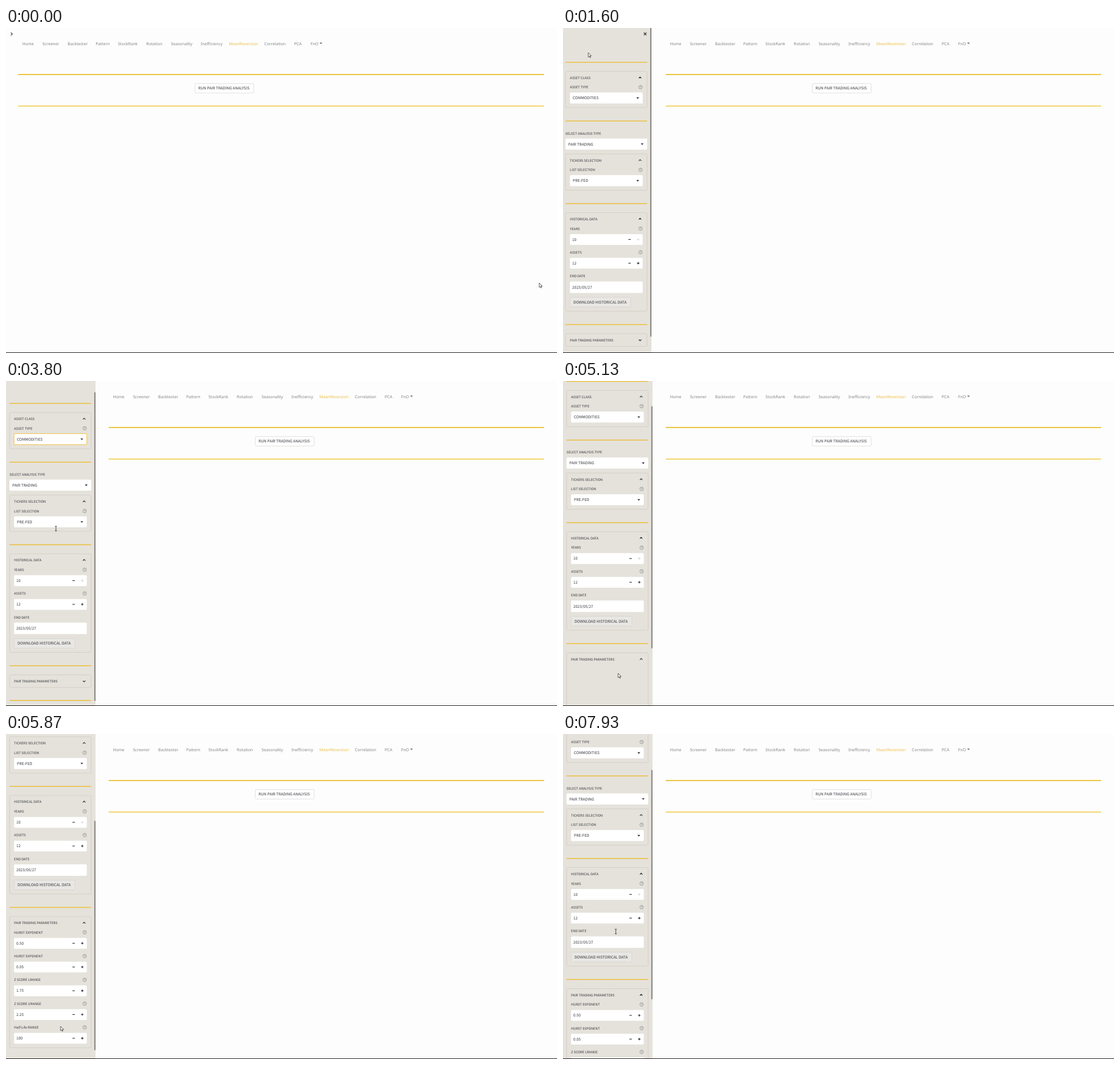
Animation of 960x566 px, one loop 8000 ms. Source, as an HTML page:

```html
<!DOCTYPE html>
<html lang="en">
<head>
<meta charset="utf-8">
<title>Pair trading dashboard</title>
<style>
  html, body { margin: 0; width: 100%; height: 100%; overflow: hidden; background: #fdfdfd; }
  svg { display: block; width: 960px; height: 566px; }
  text { font-family: "Noto Sans CJK JP", "Noto Sans CJK SC", "Noto Sans CJK", sans-serif; font-size: 5.82px; fill: #34353d; text-rendering: geometricPrecision; }
  .big { font-size: 6.62px; }
  .nav { font-family: "Noto Sans", "Open Sans", sans-serif; font-size: 7.05px; fill: #858585; }
  .nav.active { fill: #edbf45; }
  .field { fill: #fff; }
  .frame { fill: none; stroke: #d0ccc3; stroke-width: .8; }
  .button { fill: #e9e7e3; stroke: #d3d1ce; stroke-width: .8; }
  .rule { fill: #edbc30; }
  .mark { fill: none; stroke: #25262d; stroke-width: 1.1; }
  .off { stroke: #d5d5d8; }
</style>
</head>
<body>
<svg id="stage" viewBox="0 0 960 566"></svg>
<script>
const LOOP = 8000, SIDEBAR = 156, VIEW = 566;
const COLLAPSED = 596, EXTRA = 206.5;

const rect = (cls, x, y, w, h, more = '') =>
  `<rect class="${cls}" x="${x}" y="${y}" width="${w}" height="${h}" ${more}/>`;
const text = (x, middle, s, cls = '') => `<text class="${cls}" x="${x}" y="${middle + 2.3}">${s}</text>`;
const path = (d, cls = 'mark', more = '') => `<path class="${cls}" d="${d}" ${more}/>`;
const rule = (y, id = '') => rect('rule', 6, y - .7, 142.5, 1.4, id);
const chevron = (y, up) => path(up ? `M134 ${y + 1}l2.2-2.2 2.2 2.2` : `M134 ${y - 1}l2.2 2.2 2.2-2.2`);
const caret = (x, y) => `<path d="M${x - 2.4} ${y - 1.2}h4.8l-2.4 2.6z" fill="#25262d"/>`;
const help = y => `<circle cx="137" cy="${y}" r="3.1" fill="none" stroke="#85857f" stroke-width=".7"/>` +
  path(`M136 ${y - .7}q0-1 1-1t1 1q0 .6-1 1.2v.5m0 .5v.6`, 'mark', 'style="stroke:#85857f;stroke-width:.6"');

const label = (y, s) => text(14, y, s) + help(y);
const select = (x, y, w, s, id = '') =>
  rect('field', x, y - 9.7, w, 19.2, `rx="1.8" ${id}`) + text(x + 5, y, s, 'big') + caret(x + w - 8.7, y);
const stepper = (y, name, value, maxed) => label(y, name) +
  rect('field', 14, y + 9.7, 126.8, 18.8, 'rx="1.8"') + text(18, y + 19, value, 'big') +
  path(`M115.7 ${y + 19}h4.2`) +
  path(`M130.8 ${y + 19}h4.2m-2.1-2.1v4.2`, maxed ? 'mark off' : 'mark');
const panel = (top, h, title, id = '') =>
  rect('frame', 6.3, top, 142, h, `rx="1.8" ${id}`) + text(14, top + 11, title);

const navItems = [['Home', 28.5], ['Screener', 63.4], ['Backtester', 107.3], ['Pattern', 156.3],
  ['StockRank', 195], ['Rotation', 244.3], ['Seasonality', 287.4], ['Inefficiency', 339.5],
  ['MeanReversion', 388.2], ['Correlation', 450], ['PCA', 502], ['FnO', 530.8]];
const nav = navItems.map(([s, x]) =>
  `<text class="nav ${s === 'MeanReversion' ? 'active' : ''}" x="${x}" y="29.5">${s}</text>`).join('') +
  '<path d="M546.3 25.4h4.8l-2.4 2.6z" fill="#666"/>';

const runButton = '<g id="run">' +
  rect('', 329.3, 96.8, 102.5, 16.4, 'rx="1.8" fill="#fff" stroke="#d8d8da" stroke-width=".8"') +
  text(335, 105, 'RUN PAIR TRADING ANALYSIS', 'big') + '</g>';

const parameters = [['HURST EXPONENT', '0.50'], ['HURST EXPONENT', '0.05'],
  ['Z SCORE LRANGE', '1.75'], ['Z SCORE URANGE', '2.25'], ['Half-Life RANGE', '100']]
  .map(([name, value], i) => stepper(560 + 41.35 * i, name, value)).join('');

const options = ['COMMODITIES', 'CURRENCIES', 'EQUITIES', 'INDICES', 'CRYPTO', 'BONDS'];
const popover = '<g id="popover">' +
  rect('', 14, 133, 126.8, 136, 'rx="2" fill="#fff" style="filter:drop-shadow(0 1px 3px #0003)"') +
  rect('', 14, 141, 126.8, 20, 'fill="#f0efec"') +
  options.map((s, i) => text(22, 151 + 20 * i, s, 'big')).join('') + '</g>';

const sidebar = [
  path('M142.7 8l4.6 4.6m0-4.6l-4.6 4.6'),
  rule(59.7),
  panel(75.5, 63.2, 'ASSET CLASS'), chevron(86.5, true), label(103, 'ASSET TYPE'),
  select(14, 122, 126.8, 'COMMODITIES', 'id="asset"'),
  rule(162), text(6, 183.3, 'SELECT ANALYSIS TYPE'), select(6, 202.2, 142.5, 'PAIR TRADING'),
  panel(219.4, 63.2, 'TICKERS SELECTION'), chevron(230.4, true), label(247, 'LIST SELECTION'),
  select(14, 266, 126.8, 'PRE-FED'),
  rule(305.8),
  panel(321.6, 171.6, 'HISTORICAL DATA'), chevron(332.6, true),
  stepper(349.3, 'YEARS', '10', true), stepper(390.6, 'ASSETS', '12'),
  text(14, 432, 'END DATE'), rect('field', 14, 441.5, 126.8, 20, 'rx="1.8"'),
  text(18, 451.6, '2023/05/27', 'big'),
  rect('button', 14, 469, 106, 17, 'rx="1.8"'), text(20, 477.6, 'DOWNLOAD HISTORICAL DATA', 'big'),
  rule(516.5),
  panel(532.5, 22, 'PAIR TRADING PARAMETERS', 'id="params"'),
  `<g id="closed">${chevron(543.5, false)}</g><g id="opened">${chevron(543.5, true)}</g>`,
  `<g id="fields">${parameters}</g>`,
  rule(577, 'id="lastRule"'),
  popover
].join('');

document.getElementById('stage').innerHTML =
  rect('', 0, 0, 960, 566, 'fill="#fdfdfd"') +
  `<g id="opener">${path('M8.6 7.9l2.4 2.5-2.4 2.5')}</g><g id="nav">${nav}</g>` +
  rect('', 0, 80, 917, 2, 'id="ruleA" fill="#edc53f"') +
  rect('', 0, 135, 917, 1.8, 'id="ruleB" fill="#f2d35f"') + runButton +
  `<g id="sidebar">${rect('', 0, 0, SIDEBAR, VIEW, 'fill="#e5e2db"')}<g id="content">${sidebar}</g>` +
  rect('', 153.8, 0, 2.2, VIEW, 'id="thumb" fill="#8b8783"') + '</g>' +
  rect('', 0, 565, 960, 1, 'fill="#1c1c1c"') +
  '<path id="arrow" d="M0 0v7.6l1.8-1.6 1.2 2.7 1.2-.5-1.2-2.7h2.3z" fill="#fff" stroke="#333" stroke-width=".8"/>' +
  '<path id="beam" d="M-1.7-4h3.4m-1.7 0v8m-1.7 0h3.4" fill="none" stroke="#333" stroke-width=".9"/>';

const el = id => document.getElementById(id);
const set = (id, name, value) => el(id).setAttribute(name, value);
const move = (id, x, y) => set(id, 'transform', `translate(${x} ${y})`);
const show = (id, on) => el(id).style.display = on ? '' : 'none';
const progress = (t, from, to) => Math.min(1, Math.max(0, (t - from) / (to - from)));
const linear = p => p, smooth = p => p * p * (3 - 2 * p), easeOut = p => 1 - (1 - p) ** 3;

function track(keys, t, ease) {
  const next = keys.findIndex(k => k[0] > t);
  if (next < 0) return keys.at(-1).slice(1);
  if (next === 0) return keys[0].slice(1);
  const a = keys[next - 1], b = keys[next], p = ease(progress(t, a[0], b[0]));
  return a.slice(1).map((v, i) => v + (b[i + 1] - v) * p);
}

const pointer = [[60, 929, 444], [870, 35, 34], [1120, 8, 7], [1370, 9, 8], [1600, 44, 43],
  [1800, 62, 82], [2120, 112, 118], [2400, 116, 122], [2570, 116, 122], [2900, 525, 210],
  [3320, 87, 257], [4230, 87, 257], [4850, 97, 509], [5130, 96, 509], [5600, 95, 509],
  [6050, 95, 509], [6800, 56, 480], [6880, 56, 480], [7250, 114, 508], [7670, 92, 362], [7920, 92, 344]];
const scrolling = [[3270, 0], [3400, 9], [3800, 20.6], [4070, 30], [4950, 30], [5070, 43], [5130, 59],
  [5600, 120.6], [5930, 235], [6060, 237], [7680, 237], [7930, 89]];
const OPEN = 1370, FOCUS = 2150, BLUR = 2930, EXPAND = 4930;

function draw(t) {
  const open = t >= OPEN, shift = open ? 157.8 : 0;
  show('opener', !open);
  move('nav', shift, 0);
  move('run', open ? 105.1 : 0, 0);
  for (const id of ['ruleA', 'ruleB']) {
    set(id, 'x', 21 + shift);
    set(id, 'width', 916.5 - shift);
  }

  const [scroll] = track(scrolling, t, linear);
  const grown = EXTRA * easeOut(progress(t, EXPAND, EXPAND + 490));
  const ratio = VIEW / (COLLAPSED + grown);
  show('sidebar', open);
  move('sidebar', -SIDEBAR * (1 - easeOut(progress(t, OPEN, OPEN + 300))), 0);
  move('content', 0, -scroll);
  set('thumb', 'y', scroll * ratio);
  set('thumb', 'height', VIEW * ratio);
  set('params', 'height', 22 + grown);
  set('lastRule', 'y', 576.3 + grown);
  set('fields', 'opacity', progress(t, 5190, 5320));
  show('closed', t < EXPAND);
  show('opened', t >= EXPAND);
  show('popover', t >= FOCUS && t < BLUR);
  set('asset', 'stroke', t >= FOCUS && t < EXPAND ? '#f0c140' : 'none');

  const [x, y] = track(pointer, t, smooth);
  const typing = (t >= 3280 && t < 4330) || t >= 7600;
  show('beam', typing);
  show('arrow', !typing);
  move(typing ? 'beam' : 'arrow', x, y);
}

const start = performance.now();
function tick() {
  draw((performance.now() - start) % LOOP);
  requestAnimationFrame(tick);
}
tick();
</script>
</body>
</html>
```
